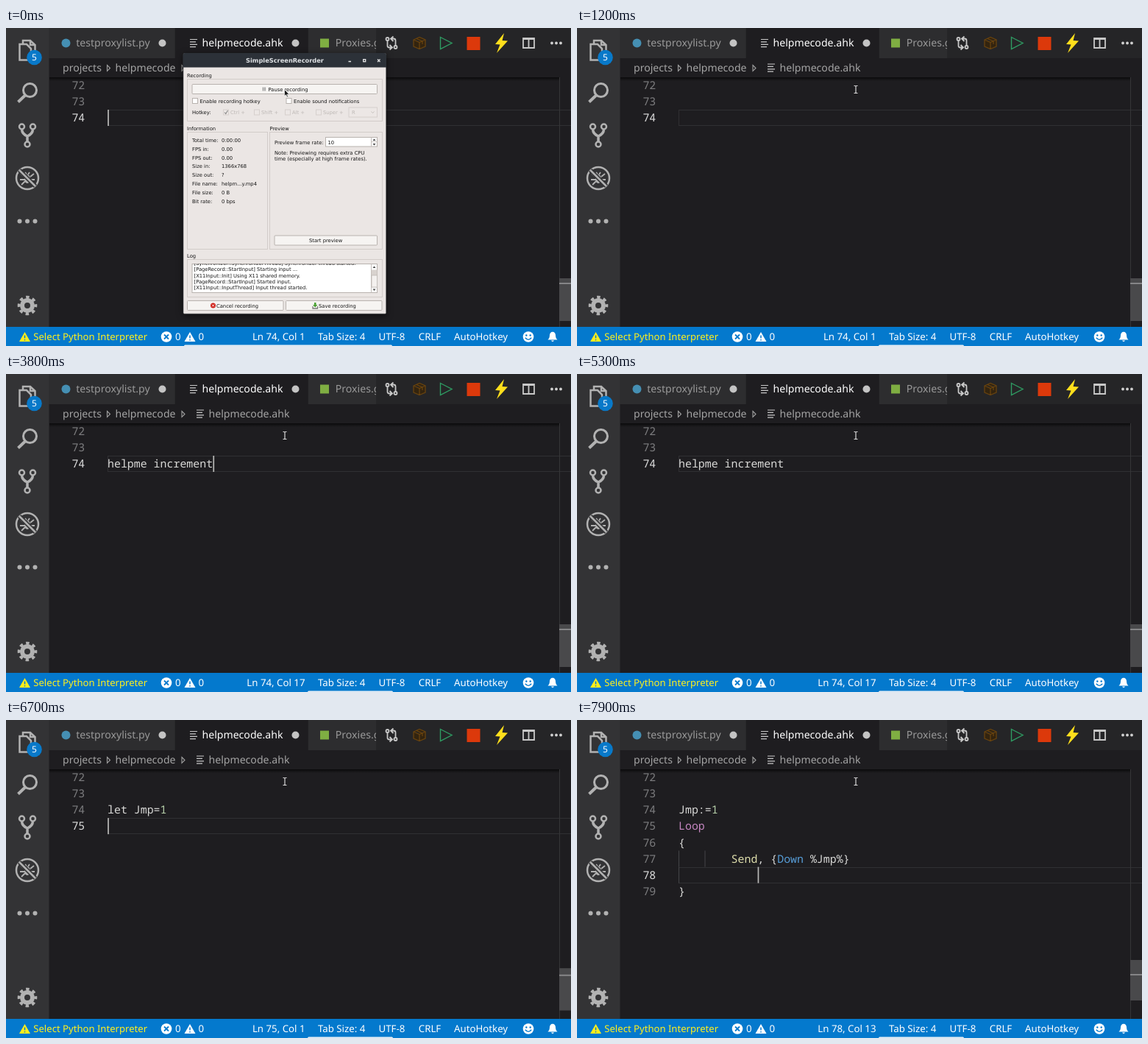
These frames come from a looping animation (768 px wide and 432 px high, 8000 ms). An HTML page:

```html
<!DOCTYPE html>
<html lang="en">
<head>
<meta charset="utf-8">
<title>Editor</title>
<style>
html, body { margin: 0; width: 100%; height: 100%; overflow: hidden; background: #1e1d20; }
svg { display: block; width: 768px; height: 432px; }
text { white-space: pre; text-rendering: geometricPrecision; }
.ui { font: 14.1px "Noto Sans", "Open Sans", sans-serif; fill: #999; }
.status { font: 13.25px "Noto Sans", "Open Sans", sans-serif; fill: #fff; }
.code { font: 14.92px "Noto Sans Mono", "DejaVu Sans Mono", monospace; fill: #d8d8d6; }
.num { fill: #7c7c7e; text-anchor: end; }
.num.on { fill: #dcdcdc; }
.Loop { fill: #c586c0; } .Send { fill: #dcdcaa; } .Down { fill: #569cd6; } .n1 { fill: #b5cea8; }
.line { fill: none; stroke: #b2b2b2; }
.dlg { font: 6.75px "DejaVu Sans", sans-serif; fill: #141414; }
.off { fill: #bdb8b5; }
.box { fill: none; stroke: #d2ccc9; }
.btn { fill: #f6f4f2; stroke: #b8b2ae; }
.field { fill: #fff; stroke: #b8b2ae; }
.dis { fill: #ece7e5; stroke: #d6d0cd; }
#win { transform-origin: 468px 432px; animation: minimise 8s infinite; filter: drop-shadow(0 2px 4px rgba(0,0,0,.6)); }
@keyframes minimise {
  0%, 1.25% { transform: none; opacity: 1; animation-timing-function: ease-in; }
  4.5% { transform: scale(.1); opacity: 0; }
  4.6%, 100% { transform: scale(0); opacity: 0; }
}
.before { animation: before 8s step-end infinite; }
.after { animation: after 8s step-end infinite; }
@keyframes before { 0% { opacity: 1; } 5% { opacity: 0; } }
@keyframes after { 0% { opacity: 0; } 5% { opacity: 1; } }
</style>
</head>
<body>
<svg viewBox="0 0 768 432" xmlns="http://www.w3.org/2000/svg">
  <defs>
    <linearGradient id="shade" x2="0" y2="1">
      <stop stop-color="#000" stop-opacity=".65"/><stop offset="1" stop-color="#000" stop-opacity="0"/>
    </linearGradient>
    <clipPath id="tabClip"><rect x="411" width="92" height="41"/></clipPath>
    <clipPath id="logClip"><rect x="253" y="320.5" width="243" height="39"/></clipPath>
    <path id="list" d="M0 1H10M0 4.4H8M0 7.8H10M0 11.2H8" stroke="#c8c8c8" stroke-width="1.2"/>
    <path id="chev" d="M0 0L4 4L0 8Z" fill="none" stroke="#a0a0a0" stroke-width="1.1"/>
    <path id="warn" d="M7.5 0L15 13H0Z"/>
  </defs>

  <rect width="768" height="432" fill="#1e1d20"/>

  <!-- code -->
  <rect id="row" x="138.5" width="640" height="21" fill="none" stroke="#303033"/>
  <g id="guides" stroke="#454548"></g>
  <g id="code" class="code"></g>
  <rect id="caret" width="1.7" height="22" fill="#b8b8b6"/>
  <path d="M752.5 67V406" stroke="#363638"/>
  <rect id="slider" x="752" width="16" fill="#49494b"/>
  <rect id="mark" x="752" width="16" height="2" fill="#858587"/>
  <rect x="59" y="67" width="693" height="5" fill="url(#shade)"/>

  <!-- tabs and breadcrumbs -->
  <rect x="58" width="710" height="41" fill="#252527"/>
  <rect x="58" width="171.5" height="41" fill="#2d2d2f"/>
  <rect x="230" width="180.5" height="41" fill="#1e1d20"/>
  <rect x="411" width="92" height="41" fill="#2d2d2f"/>
  <circle cx="81.5" cy="20.5" r="6" fill="#458fb3"/>
  <text class="ui" x="95.2" y="25.2">testproxylist.py</text>
  <circle cx="212.5" cy="20.5" r="5" fill="#c4c4c4"/>
  <use href="#list" x="250" y="14.5"/>
  <text class="ui" x="266.5" y="25.2" style="fill:#fff">helpmecode.ahk</text>
  <circle cx="393.5" cy="20.5" r="5" fill="#c4c4c4"/>
  <g clip-path="url(#tabClip)">
    <rect x="427" y="14.5" width="12" height="12" fill="#7fae42"/>
    <text class="ui" x="447.8" y="25.2">Proxies.g</text>
  </g>
  <g fill="none" stroke="#c8c8c8" stroke-width="1.8">
    <circle cx="518.5" cy="15" r="2"/><circle cx="529.5" cy="26" r="2"/>
    <path d="M518.5 17V24Q518.5 26.500 521 26.500H524M521.500 23L525 26.500L521.500 29.500M529.500 24V17Q529.500 14.500 527 14.500H524M526.500 11.500L523 14.500L526.500 18"/>
    <path d="M703 14H718V27H703ZM710.500 14V27M703 15H718"/>
  </g>
  <path d="M554 16L562 12.500L570 16V25L562 28.500L554 25ZM554 16L562 19.500L570 16M562 19.500V28.500M558 14.500L566 18V22" fill="#33240f" stroke="#68430f" stroke-width="1.3"/>
  <path d="M590.5 12.500L606 20.500L590.500 28.500Z" fill="none" stroke="#2f9b62" stroke-width="1.4"/>
  <rect x="626.5" y="12" width="18" height="18" fill="#dc390b"/>
  <path d="M677 7L665 22L671.500 22.500L667 34L682 17.500L674.500 17Z" fill="#ffdf1c"/>
  <g fill="#d0d0d0"><circle cx="742" cy="20.5" r="1.9"/><circle cx="748" cy="20.5" r="1.9"/><circle cx="754" cy="20.5" r="1.9"/></g>
  <g class="ui" style="fill:#a4a4a4">
    <text x="77" y="59.2">projects</text><use href="#chev" x="137.5" y="50.5"/>
    <text x="148.5" y="59.2">helpmecode</text><use href="#chev" x="239" y="50.5"/>
    <use href="#list" x="259" y="48"/><text x="275.5" y="59.2">helpmecode.ahk</text>
  </g>

  <!-- activity bar -->
  <rect width="58.5" height="406" fill="#333335"/>
  <g class="line" stroke-width="2.5">
    <path d="M23 22V17H33L39.500 23V38H34M33 17V23H39"/>
    <path d="M18.500 22H28L34 28V43.500H18.500Z" fill="#333335"/>
    <circle cx="32.500" cy="84.500" r="9" stroke-width="3"/>
    <path d="M26 91.500L16.500 100.500" stroke-width="4"/>
    <circle cx="21.500" cy="134" r="3.500"/><circle cx="36.500" cy="134" r="3.500"/><circle cx="29" cy="158" r="3.500"/>
    <path d="M21.500 138Q22 144 29 147Q36 144 36.500 138M29 146V154" stroke-width="3.500"/>
    <circle cx="29" cy="204" r="15"/>
    <ellipse cx="29" cy="205" rx="4" ry="6" fill="#b2b2b2" stroke="none"/>
    <path d="M20 198L25 202M38 198L33 202M19 206H39M21 213L26 208M37 213L32 208M26 196L28 199M32 196L30 199" stroke-width="1.800"/>
    <path d="M18 193L40 215" stroke="#333335" stroke-width="6"/><path d="M18 193L40 215"/>
    <circle cx="29" cy="377" r="7" stroke-width="6"/>
    <circle cx="29" cy="377" r="11.300" stroke-width="4" stroke-dasharray="4.437" stroke-dashoffset="2.200"/>
  </g>
  <g fill="#b2b2b2"><circle cx="18.5" cy="262.5" r="3"/><circle cx="29" cy="262.5" r="3"/><circle cx="39.5" cy="262.5" r="3"/></g>
  <circle cx="38.5" cy="40" r="10.3" fill="#0879c9"/>
  <text x="38.5" y="44.3" text-anchor="middle" class="status" style="font-size:12px">5</text>

  <!-- status bar -->
  <rect y="406" width="768" height="26" fill="#0479cd"/>
  <g class="status">
    <use href="#warn" x="18" y="413" fill="#ffee1a"/>
    <path d="M25.500 417.500V421.500M25.500 423V424.600" stroke="#0479cd" stroke-width="1.5"/>
    <text x="37.3" y="424.3" style="fill:#fff01c;font-size:13.1px">Select Python Interpreter</text>
    <circle cx="218" cy="419.5" r="7.3"/>
    <path d="M215 416.500L221 422.500M221 416.500L215 422.500" stroke="#0479cd" stroke-width="1.8"/>
    <text x="230" y="424.3">0</text>
    <use href="#warn" x="242.5" y="413"/>
    <path d="M250 417.500V421.500M250 423V424.600" stroke="#0479cd" stroke-width="1.5"/>
    <text x="261.5" y="424.3">0</text>
    <text id="pos" x="406.5" y="424.3" text-anchor="end"></text>
    <text x="424" y="424.3">Tab Size: 4</text>
    <text x="506.5" y="424.3">UTF-8</text>
    <text x="560.8" y="424.3">CRLF</text>
    <text x="609" y="424.3">AutoHotkey</text>
    <circle cx="710" cy="419.5" r="7.3"/>
    <g fill="#0479cd"><circle cx="707.3" cy="417.5" r="1.2"/><circle cx="712.7" cy="417.5" r="1.2"/></g>
    <path d="M705.800 420.800Q710 426 714.200 420.800" fill="none" stroke="#0479cd" stroke-width="1.4"/>
    <path d="M736.500 423.500Q739 421.500 739 417Q739.500 413 743 412.800Q746.500 413 747 417Q747 421.500 749.500 423.500ZM741 424.500H745Q743 427.500 741 424.500Z"/>
  </g>
  <g fill="#e4eef6">
    <rect class="before" x="242" y="430.5" width="283" height="4" rx="1.5"/>
    <rect class="after" x="410" y="430.5" width="116" height="4" rx="1.5"/>
  </g>

  <!-- recorder window -->
  <g id="win">
    <rect x="241" y="34.5" width="275.7" height="353.8" rx="1.5" fill="#ebe6e4" stroke="#43474b" stroke-width=".6"/>
    <path d="M240.700 53.500V37Q240.700 34 243.700 34H514Q517 34 517 37V53.500Z" fill="#2c3138"/>
    <text x="379" y="46.8" text-anchor="middle" style="font:bold 8.25px 'DejaVu Sans',sans-serif;fill:#dfe2e5">SimpleScreenRecorder</text>
    <g fill="none" stroke="#e6e6e6" stroke-width="1.3"><path d="M465.500 45.500H469M505 42.500L508.500 46M508.500 42.500L505 46"/><rect x="485.7" y="42.7" width="3" height="3"/></g>
    <g class="box">
      <rect x="246.5" y="69.5" width="265" height="57"/><rect x="246.5" y="141.5" width="109" height="159"/>
      <rect x="358.5" y="141.5" width="153" height="159"/><rect x="246.5" y="314.5" width="265" height="51"/>
    </g>
    <g class="btn">
      <rect x="253" y="76.5" width="251.5" height="13" rx="1"/><rect x="365" y="282" width="139.5" height="13" rx="1"/>
      <rect x="246.5" y="370.5" width="130.5" height="13" rx="1"/><rect x="380.5" y="370.5" width="130.5" height="13" rx="1"/>
    </g>
    <g class="field">
      <rect x="253.5" y="95.5" width="7" height="7"/><rect x="381" y="95.5" width="7" height="7"/>
      <rect x="434.5" y="148.5" width="70" height="12.5"/><rect x="253" y="320.5" width="251.5" height="39"/>
    </g>
    <g class="dis">
      <rect x="295.5" y="111" width="7" height="7"/><rect x="337.5" y="111" width="7" height="7"/><rect x="379.5" y="111" width="7" height="7"/>
      <rect x="421.5" y="111" width="7" height="7"/><rect x="466" y="108" width="38.5" height="13"/>
    </g>
    <path d="M297 114.500L298.700 116.500L301.500 112" fill="none" stroke="#888" stroke-width="1.1"/>
    <path d="M496.500 113.500L498.500 115.500L500.500 113.500" fill="none" stroke="#c5bfbb"/>
    <path d="M349.500 80.500V85.500M352 80.500V85.500" stroke="#999" stroke-width="1.6"/>
    <path d="M496.500 148.500V161M496.500 154.700H504.500M496.500 320.500V359.500" stroke="#c5bfbb"/>
    <path d="M498.500 153L500.500 150.500L502.500 153ZM498.500 157L500.500 159.500L502.500 157ZM498.500 326L500.500 323.500L502.500 326ZM498.500 354.500L500.500 357L502.500 354.500Z" fill="#444"/>
    <rect x="497" y="328.5" width="7.5" height="24" fill="#d8d2ce"/><rect x="497" y="336" width="7.5" height="16" fill="#f4f1ef" stroke="#b8b2ae" stroke-width=".7"/>
    <circle cx="281.5" cy="377" r="3.5" fill="#cf2119"/><path d="M280 375.500L283 378.500M283 375.500L280 378.500" stroke="#fff" stroke-width=".9"/>
    <path d="M417 378V381H423.500V378" fill="none" stroke="#777" stroke-width="1.3"/><path d="M419 373H421.500V376H423.500L420.200 379.500L417 376H419Z" fill="#49a032"/>
    <g class="dlg" id="labels"></g>
    <g class="dlg" id="log" clip-path="url(#logClip)"></g>
  </g>

  <path class="before" d="M378.500 83.500V92.500L380.600 90.700L382 94L383.500 93.300L382 90.200H385Z" fill="#1b1b1b" stroke="#fff" stroke-width=".7"/>
  <path class="after" d="M376.500 78.500H378Q379 78.500 379 79.500Q379 78.500 380 78.500H381.500M379 79V88M376.500 88.500H378Q379 88.500 379 87.500Q379 88.500 380 88.500H381.500" fill="none" stroke="#d8d8d8" stroke-width="1.2"/>
</svg>
<script>
const $ = id => document.getElementById(id);
const label = (x, y, s, cls = '') => `<text x="${x}" y="${y + 2.5}" class="${cls}">${s}</text>`;

const info = [['Total time', '0:00:00'], ['FPS in', '0.00'], ['FPS out', '0.00'], ['Size in', '1366x768'],
  ['Size out', '?'], ['File name', 'helpm...y.mp4'], ['File size', '0 B'], ['Bit rate', '0 bps']];
$('labels').innerHTML = [
  [246, 64, 'Recording'], [356.5, 83, 'Pause recording'], [263.5, 99, 'Enable recording hotkey'],
  [391, 99, 'Enable sound notifications'], [253, 114.5, 'Hotkey:'],
  [305, 114.5, 'Ctrl +', 'off'], [347, 114.5, 'Shift +', 'off'], [389, 114.5, 'Alt +', 'off'],
  [431, 114.5, 'Super +', 'off'], [470, 114.5, 'R', 'off'],
  [246, 136, 'Information'], [358.5, 136, 'Preview'], [365, 155, 'Preview frame rate:'], [437.5, 155, '10'],
  [365, 169, 'Note: Previewing requires extra CPU'], [365, 177, 'time (especially at high frame rates).'],
  [412, 288.5, 'Start preview'], [246, 309, 'Log'], [286, 377, 'Cancel recording'], [425, 377, 'Save recording'],
  ...info.flatMap(([k, v], i) => [[253, 152.5 + 11.8 * i, k + ':'], [293, 152.5 + 11.8 * i, v]])
].map(a => label(...a)).join('');
$('log').innerHTML = ['[Synchronizer::SynchronizerThread] Synchronizer thread started.',
  '[PageRecord::StartInput] Starting input ...', '[X11Input::Init] Using X11 shared memory.',
  '[PageRecord::StartInput] Started input.', '[X11Input::InputThread] Input thread started.'
].map((s, i) => label(255.5, 319.2 + 8.4 * i, s)).join('');

// Editor contents over time; "|" is the caret.
const steps = [[0, '|'], [600, '|']];
const typed = 'helpme increment';
[1500, 1600, 1700, 1800, 1900, 2100, 2300, 2600, 2700, 2900, 3000, 3200, 3300, 3500, 3600, 3800]
  .forEach((at, i) => steps.push([at, typed.slice(0, i + 1) + '|']));
const loop = 'Jmp:=1\nLoop\n{\n        ';
steps.push([5800, 'helpme incre|'], [5900, 'helpme|'], [6000, '|'], [6100, 'let|'], [6200, 'let J|'],
  [6300, 'let Jmp|'], [6400, 'let Jmp=|'], [6500, 'let Jmp=1|'], [6600, 'let Jmp=1\n|'], [6800, 'let Jmp|'],
  [6900, 'let|'], [7000, '|'], [7100, 'J|'], [7200, 'Jmp|'], [7300, 'Jmp:=|'], [7400, 'Jmp:=1|'],
  [7500, 'Jmp:=1\n|'], [7600, 'Jmp:=1\nLoop|'], [7700, loop + '|\n}'], [7800, loop + 'Send, {Down|}\n}'],
  [7900, loop + 'Send, {Down %Jmp%}\n            |\n}']);

const LEFT = 138, PITCH = 8.95, ROW = 22.15, BASE = 127.2;
const set = (id, attrs) => { for (const k in attrs) $(id).setAttribute(k, attrs[k]); };
const paint = s => s.replace(/Loop|Send|Down|1/g, w => `<tspan class="${w === '1' ? 'n1' : w}">${w}</tspan>`);

function draw(text) {
  const before = text.split('|')[0].split('\n');
  const cur = before.length - 1, col = before[cur].length;
  const lines = text.replace('|', '').split('\n'), extra = lines.length - 1;
  $('code').innerHTML = ['', '', ...lines].map((s, i) => {
    const y = BASE + ROW * (i - 2);
    return `<text class="num ${i - 2 === cur ? 'on' : ''}" x="107.3" y="${y}">${72 + i}</text>` +
      `<text x="${LEFT}" y="${y}">${paint(s)}</text>`;
  }).join('');
  $('guides').innerHTML = lines.map((s, i) => {
    const y = 111 + ROW * i;
    return !s.startsWith('    ') ? '' : `<path d="M138.5 ${y}v${ROW}${s.trim() ? `M174 ${y}v${ROW}` : ''}"/>`;
  }).join('');
  const y = 111 + ROW * cur;
  set('row', { y: Math.round(y) + .5 });
  set('caret', { x: LEFT + PITCH * col + .2, y });
  set('slider', { y: 340 - 2.8 * extra, height: 58 - .6 * extra });
  set('mark', { y: 346 - .2 * extra });
  $('pos').textContent = `Ln ${74 + cur}, Col ${col + 1}`;
}

let shown;
function tick() {
  const t = (performance.now() + 10) % 8000;
  const step = steps.filter(s => s[0] <= t).pop();
  if (step !== shown) draw((shown = step)[1]);
  $('caret').style.opacity = (t - step[0]) % 1000 < 500 ? 1 : 0;
  requestAnimationFrame(tick);
}
tick();
</script>
</body>
</html>
```
